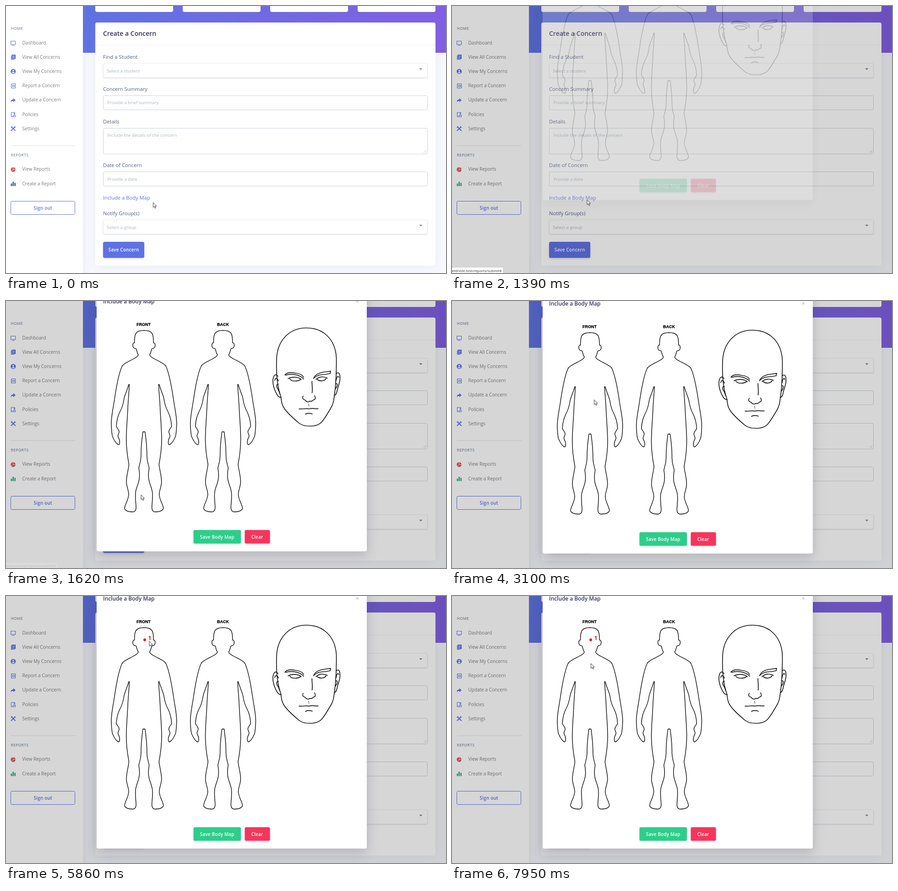
Animation, 961 px wide and 582 px high, one loop 8 s. Source, as an HTML page:

```html
<!DOCTYPE html>
<html lang="en">
<head>
<meta charset="utf-8">
<title>Create a Concern</title>
<style>
  html, body { margin: 0; width: 100%; height: 100%; overflow: hidden; background: #f8f9fe; }
  svg { display: block; width: 100%; height: 100%; }
  text { font-family: "Open Sans", "Noto Sans", sans-serif; }

  .nav { font-size: 10.08px; fill: #7f7f7f; }
  .head { font-size: 8.4px; font-weight: 600; letter-spacing: .04em; fill: #8898aa; }
  .label { font-size: 11.2px; fill: #525f7f; }
  .hint { font-size: 9.8px; fill: #adb5bd; }
  .btn { font-size: 9.8px; font-weight: 600; letter-spacing: .025em; text-anchor: middle; fill: #fff; }
  .title { font-weight: 600; fill: #32325d; }
  .fig { font: bold 9px "Liberation Sans", Arial, sans-serif; text-anchor: middle; stroke: #000; stroke-width: .3; }

  .card { fill: #fff; filter: drop-shadow(0 0 11px rgba(136,152,170,.15)); }
  .field { fill: #fff; stroke: #cad1d7; }
  .select { fill: #fff; stroke: #e4e7ec; stroke-width: .7; filter: drop-shadow(0 1px 1px rgba(50,50,93,.18)); }
  .raised { filter: drop-shadow(0 2px 2px rgba(50,50,93,.18)); }
  .sheet { fill: #fff; filter: drop-shadow(0 8px 12px rgba(50,50,93,.22)); }
  .ink { fill: none; stroke: #111; stroke-width: 1.45; stroke-linejoin: round; stroke-linecap: round; }
  .face { stroke-width: 1.65; }

  .dim, .fade, .slide, .mark, .status, .cursor, .arrow, .hand, .bars { animation: 8s linear infinite; }
  .dim { animation-name: dim; }
  .fade { animation-name: fade; }
  .slide { animation-name: slide; }
  .mark { animation-name: mark; animation-timing-function: step-end; }
  .status { animation-name: status; }
  .cursor { animation-name: move; animation-timing-function: ease-in-out; }
  .arrow { animation-name: arrow; animation-timing-function: step-end; }
  .hand { animation-name: hand; animation-timing-function: step-end; }
  .bars { animation-name: bars; }

  @keyframes dim { 0%, 15% { opacity: 0 } 16.9%, 100% { opacity: .16 } }
  @keyframes fade { 0%, 17.04% { opacity: 0 } 18.92%, 100% { opacity: 1 } }
  @keyframes slide {
    0% { transform: translateY(-150px) }
    17.04% { transform: translateY(-150px); animation-timing-function: ease-out }
    20.79%, 100% { transform: none }
  }
  @keyframes mark { 0% { opacity: 0 } 57.25%, 100% { opacity: 1 } }
  @keyframes status { 0%, 5.6% { opacity: 0 } 7.5%, 18% { opacity: 1 } 20.6%, 100% { opacity: 0 } }
  @keyframes arrow { 0% { opacity: 1 } 5% { opacity: 0 } 15.6%, 100% { opacity: 1 } }
  @keyframes hand { 0% { opacity: 0 } 5% { opacity: 1 } 15.6%, 100% { opacity: 0 } }
  @keyframes bars { 0%, 15% { fill: #3c698d } 16.9%, 100% { fill: #36b27d } }
  @keyframes move {
    0% { transform: translate(321.5px, 428.5px) }
    3.75% { transform: translate(308px, 418px) }
    6.5% { transform: translate(298px, 414px) }
    9.25%, 27.2% { transform: translate(295px, 422.5px) }
    28.88% { transform: translate(292px, 409.5px) }
    33.6% { transform: translate(292px, 409.5px); animation-timing-function: cubic-bezier(.4,0,.8,.9) }
    38.75% { transform: translate(310.5px, 215.5px); animation-timing-function: linear }
    41% { transform: translate(320px, 160px); animation-timing-function: ease-out }
    43.88%, 44.1% { transform: translate(310px, 122.5px) }
    46.75%, 48.2% { transform: translate(305px, 101.5px) }
    51.88%, 54.9% { transform: translate(303.5px, 96.5px) }
    55%, 66.8% { transform: translate(303.5px, 95.5px) }
    69.38%, 71.9% { transform: translate(303.5px, 98px) }
    80.25% { transform: translate(477.5px, 103.5px) }
    85.6% { transform: translate(477.5px, 103.5px); animation-timing-function: ease-in }
    89.8% { transform: translate(410px, 150px); animation-timing-function: linear }
    92.4% { transform: translate(358px, 158px); animation-timing-function: ease-out }
    95.25%, 95.6% { transform: translate(322px, 136px) }
    99.38%, 100% { transform: translate(303.5px, 147px) }
  }
</style>
</head>
<body>
<svg viewBox="0 0 961 582" preserveAspectRatio="none">
  <defs>
    <linearGradient id="sky"><stop stop-color="#5e72e4"/><stop offset="1" stop-color="#825ee4"/></linearGradient>
    <path id="caret" d="M-3.6,-1.9H3.6L0,1.9Z" fill="#888"/>
    <g id="half">
      <path d="M301.5,69C294,69 287,70.5 284,75C280,81 281,89 280.5,96C276,96 276.5,103 278,106C279.5,109 283,107 284.5,109.5C286,114 286,118 289,122C288,130 262,136 254,146"/>
      <path d="M254,146C246,162 240,198 236.500,222C233,245 229.500,258 230,274C230.500,285 230.500,292 232.500,300C236,308 240,316 245.500,318C249,318.500 248.500,311 247.500,307C246.500,303 244,301 244.500,298C245,295 247.500,293 247,289C246,284 242.500,282 241,278C241.500,268 244,256 248.500,247C254,237 256.500,228 258,217C260,208 266,196 268,187H269.500"/>
      <path d="M269.500,187C268.500,205 266.500,225 266,240C265,262 263.500,275 263,295C262,315 264.500,340 268.500,361C267,375 263,385 263,399C263,410 268.500,418 268,428C266,442 259,449 259,457C261,464 272,464.500 278,464.500C284,463.500 284.500,458 284,452C283.500,442 282,436 283,422C285,408 291,402 291.500,388C292,378 291,374 290,369C291,362 294.500,358 295,342C294.500,322 297,305 299,290H301.500"/>
    </g>
    <g id="body">
      <use href="#half"/>
      <use href="#half" transform="matrix(-1 0 0 1 602.7 0)"/>
    </g>
  </defs>

  <!-- page -->
  <rect width="961" height="582" fill="#f8f9fe"/>
  <rect x="168" width="793" height="102" fill="url(#sky)"/>
  <g class="card">
    <rect x="195" y="-40" width="170" height="53" rx="4"/>
    <rect x="386" y="-40" width="170" height="53" rx="4"/>
    <rect x="577" y="-40" width="170" height="53" rx="4"/>
    <rect x="768" y="-40" width="170" height="53" rx="4"/>
    <rect x="195" y="36" width="743" height="530" rx="4"/>
  </g>
  <path d="M195,85.5H938" stroke="#eef0f3"/>
  <text class="title" x="212" y="65" font-size="14">Create a Concern</text>

  <g class="label">
    <text x="212" y="115">Find a Student</text>
    <text x="212" y="185">Concern Summary</text>
    <text x="212" y="256">Details</text>
    <text x="212" y="351">Date of Concern</text>
    <text x="212" y="422" fill="#5e72e4">Include a Body Map</text>
    <text x="212" y="456">Notify Group(s)</text>
  </g>
  <g class="select">
    <rect x="212.5" y="125" width="708" height="31" rx="3"/>
    <rect x="212.5" y="466" width="708" height="31" rx="3"/>
  </g>
  <use href="#caret" x="906" y="137.7"/>
  <use href="#caret" x="906" y="478.7"/>
  <g class="field">
    <rect x="212.5" y="195.5" width="708" height="31" rx="3"/>
    <rect x="212.5" y="266.5" width="708" height="56" rx="3"/>
    <rect x="212.5" y="361.5" width="708" height="31" rx="3"/>
  </g>
  <path d="M912,319.5L918,314M915,319.5L918,317" stroke="#999" stroke-width=".9" stroke-dasharray="1.2 1"/>
  <g class="hint">
    <text x="220" y="145">Select a student</text>
    <text x="221.5" y="214">Provide a brief summary</text>
    <text x="221.5" y="285">Include the details of the concern</text>
    <text x="221.5" y="381">Provide a date</text>
    <text x="220" y="486">Select a group</text>
  </g>
  <rect class="raised" x="212" y="514" width="90" height="35" rx="3.5" fill="#5e72e4"/>
  <text class="btn" x="257.2" y="535">Save Concern</text>

  <!-- sidebar -->
  <rect class="card" y="-30" width="168" height="642"/>
  <g class="head">
    <text x="10.5" y="52">HOME</text>
    <text x="10.5" y="328">REPORTS</text>
  </g>
  <path d="M10.5,304.5H151" stroke="#e0e1e3"/>
  <g class="nav">
    <text x="35.5" y="84">Dashboard</text>
    <text x="35.5" y="115">View All Concerns</text>
    <text x="35.5" y="146">View My Concerns</text>
    <text x="35.5" y="177">Report a Concern</text>
    <text x="35.5" y="208">Update a Concern</text>
    <text x="35.5" y="240">Policies</text>
    <text x="35.5" y="271">Settings</text>
    <text x="35.5" y="359">View Reports</text>
    <text x="35.5" y="391">Create a Report</text>
  </g>
  <g fill="none" stroke="#5e72e4" stroke-width="1.1">
    <path d="M10.7,76.5H20.6V84H10.7ZM13,86H18.5"/>
    <path d="M11.5,108V116.5H18"/>
    <path d="M13,106.5H20.5V115H13Z" fill="#5e72e4"/>
    <path d="M14.5,109H19M14.5,111H19M14.5,113H17.5" stroke="#fff" stroke-width=".7"/>
    <circle cx="15.8" cy="142.7" r="5" fill="#5e72e4"/>
    <path d="M12,169.5H20.5V179H12ZM10.5,172H12.5M10.5,176.5H12.5M14.5,172.8H18.5V175.7H14.5Z"/>
    <path d="M17,232H11.5V241.5H20.5V239M13.5,239.5H17"/>
    <path d="M12,263.5L20,271.5M19.5,263.5L11.5,271.5" stroke-width="2" stroke-linecap="round"/>
    <path d="M10.7,265L13.5,262.3M18,262.5L20.7,265.3" stroke-width="1.5"/>
  </g>
  <g fill="#5e72e4">
    <path d="M16,201L21,205.3L16,209.5V207C13,206.8 11.5,208 10.5,210C10.5,206 12.5,203.7 16,203.5Z"/>
    <circle cx="18.5" cy="233.5" r="1.7"/>
    <path d="M15.5,238.5Q18.5,234 21.5,238.5Z"/>
  </g>
  <g fill="#fff">
    <circle cx="15.8" cy="141" r="1.8"/>
    <path d="M12.5,145.5Q15.8,141.7 19.1,145.5Q15.8,148 12.5,145.5Z"/>
  </g>
  <circle cx="15.6" cy="356.5" r="5.2" fill="#e0525c"/>
  <path d="M15.6,351V356.5H21M15.6,356.5L12,360.5" fill="none" stroke="#fff" stroke-width=".8"/>
  <path class="bars" d="M10.5,387H13.3V392.5H10.5ZM14.3,383H17V392.5H14.3ZM18.2,385.5H21V392.5H18.2Z"/>
  <rect x="10.5" y="425.5" width="140" height="29" rx="3" fill="#fff" stroke="#5e72e4"/>
  <text class="btn" x="80.8" y="443.500" style="fill:#5e72e4">Sign out</text>

  <rect class="dim" width="961" height="582"/>

  <!-- dialog -->
  <g class="fade"><g class="slide">
    <rect class="sheet" x="198" y="-40" width="590" height="590.5" rx="4"/>
    <text class="title" x="212" y="10" font-size="11.9">Include a Body Map</text>
    <path d="M764.8,2.8L769.8,7.8M769.8,2.8L764.8,7.8" stroke="#999"/>
    <text class="fig" x="300.6" y="59.3">FRONT</text>
    <text class="fig" x="474" y="59.3">BACK</text>
    <g class="ink">
      <use href="#body"/>
      <use href="#body" x="172.7"/>
      <g class="face">
        <path d="M656,63.5C618,63.5 592,92 591,132C590,160 592,190 600,212C602,222 601,228 606,236C613,249 632,264 640,271C647,277 657,277.5 664,277.5C677,277.5 685,274 690,268C699,257 704,247 709,239C716,228 716,218 718,205C721,180 722,155 721.5,128C719,88 693,63.5 656,63.5Z"/>
        <path d="M594,169C588,161 583,168 583,180C583,192 588,202 592,209C595,214 598,215 601,215M721,163C727,158 730,164 729.5,175C729,184 726,188 724,197C722,206 721,210 717,210"/>
        <path d="M587,178C588,171 593,173 595,179M595,186C590,186 590,192 594,197C596,201 597,204 598,207M727,171C724,166 722,172 721,178M721,185C725,184 724,190 720,196"/>
        <path d="M609,166C614,160 623,160 632,162C642,163 648,166 650,171M611,166.5C621,163 634,165 640,168C645,170 648,172 650,175"/>
        <path d="M671.5,174C674,167 680,163 688,161C696,159 705,159 709,157.500L708,163M674,172C680,166 688,165 695,165C700,165 705,163 708,163"/>
        <path d="M616,174C624,170 637,169 645,176M620,175C625,181 638,180 643,176M677,176C684,169 694,169 702,173M680,176C686,181 696,179 699,174"/>
        <path d="M668.3,180C668,188 670,196 668.5,205"/>
        <path d="M649,212C646.500,217 649,220 653,220.500C656,225 660,226 664,223C668,225 670,222 672,220C676,220 676.500,216 674,211M661,230V230.5M661.5,233V233.3"/>
        <path d="M640,240C648,241 655,238 661,240C668,238 674,240 682,239.5M654,251.500C658,249 664,249.500 669,251"/>
      </g>
    </g>
    <g class="raised">
      <rect x="409.500" y="504" width="103.500" height="29.500" rx="3" fill="#2dce89"/>
      <rect x="521.500" y="504" width="55" height="29.500" rx="3" fill="#f5365c"/>
    </g>
    <text class="btn" x="461.2" y="523">Save Body Map</text>
    <text class="btn" x="548.7" y="523">Clear</text>
  </g></g>

  <g class="mark" fill="#f01010">
    <circle cx="303" cy="95.5" r="2.9"/>
    <text x="310.5" y="95.5" font-size="12" font-weight="700">1</text>
  </g>

  <g class="status">
    <rect x="-2" y="569.5" width="114" height="14" fill="#fff" stroke="#c8c8c8" stroke-width=".8"/>
    <text x="0" y="579.5" font-size="8" fill="#333">eldnote.test/reports/submit#</text>
  </g>

  <g class="cursor" fill="#fff" stroke="#222" stroke-width=".9" stroke-linejoin="round">
    <path class="arrow" d="M0,0V10.7L2.5,8.4L4.2,12.3L5.9,11.6L4.2,7.8H7.6Z"/>
    <path class="hand" d="M-1,1Q0,-.7 1,1V5L6,6.2Q7.5,6.8 7,9L6,13H0L-3.5,8.5Q-3.6,6.6 -1,8Z"/>
  </g>
</svg>
</body>
</html>
```
